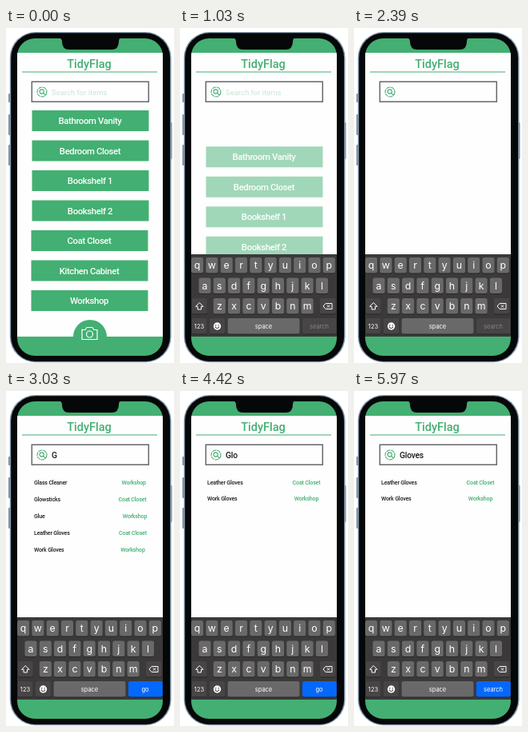
Recreate the animation shown at these times as an HTML page with a canvas. Size 210x419 px, loop 6 s.

```html
<!DOCTYPE html>
<html lang="en">
<head>
<meta charset="utf-8">
<title>TidyFlag</title>
<style>
html, body { margin: 0; width: 100%; height: 100%; overflow: hidden; background: #fff; }
canvas { display: block; width: 210px; height: 419px; }
</style>
</head>
<body>
<canvas id="stage"></canvas>
<script>
const W = 210, H = 419, LOOP = 6000;
const GREEN = '#43af72', LABEL = 'Roboto, sans-serif', KEYS = 'Inter, sans-serif';
const dpr = window.devicePixelRatio || 1;

function prepare(canvas) {
  canvas.width = W * dpr;
  canvas.height = H * dpr;
  const c = canvas.getContext('2d');
  c.scale(dpr, dpr);
  return c;
}

const stage = prepare(document.getElementById('stage'));
const layer = prepare(document.createElement('canvas'));
let ctx = stage;

const PLACES = ['Bathroom Vanity', 'Bedroom Closet', 'Bookshelf 1', 'Bookshelf 2',
  'Coat Closet', 'Kitchen Cabinet', 'Workshop'];
const ITEMS = [
  ['Glass Cleaner', 'Workshop', 159.7],
  ['Glowsticks', 'Coat Closet', 158],
  ['Glue', 'Workshop', 161],
  ['Leather Gloves', 'Coat Closet', 158.5],
  ['Work Gloves', 'Workshop', 158.5]
];
const TYPED = [2500, 3200, 3900, 4600, 5100, 5600];

const clamp = v => Math.max(0, Math.min(1, v));
const ease = (t, a, b) => { const p = clamp((t - a) / (b - a)); return p * p * (3 - 2 * p); };

function box(x, y, w, h, r, color) {
  ctx.fillStyle = color;
  ctx.beginPath();
  ctx.roundRect(x, y, w, h, r);
  ctx.fill();
}

function text(s, x, y, font, color, align = 'center', spacing = 0) {
  ctx.font = font;
  ctx.fillStyle = color;
  ctx.textAlign = align;
  ctx.letterSpacing = spacing + 'px';
  ctx.fillText(s, x, y);
}

function line(color, width, ...pts) {
  ctx.strokeStyle = color;
  ctx.lineWidth = width;
  ctx.beginPath();
  pts.forEach(([x, y], i) => i ? ctx.lineTo(x, y) : ctx.moveTo(x, y));
  ctx.stroke();
}

function ring(x, y, r, color, width, a = 0, b = Math.PI * 2) {
  ctx.strokeStyle = color;
  ctx.lineWidth = width;
  ctx.beginPath();
  ctx.arc(x, y, r, a, b);
  ctx.stroke();
}

function disc(x, y, r, color) {
  ctx.fillStyle = color;
  ctx.beginPath();
  ctx.arc(x, y, r, 0, Math.PI * 2);
  ctx.fill();
}

function phone() {
  const edge = '#7d92a5';
  box(3, 82, 4, 11, 1, edge);
  box(3, 108, 4, 26, 1, edge);
  box(3, 146, 4, 26, 1, edge);
  box(204, 118, 3.5, 46, 1, edge);
  box(4.8, 5, 201.7, 413.2, 32, '#8498aa');
  box(6.2, 6.2, 198.9, 410.8, 31, '#060708');
}

function notch() {
  ctx.fillStyle = '#060708';
  ctx.beginPath();
  ctx.moveTo(66, 12);
  ctx.lineTo(144, 12);
  ctx.quadraticCurveTo(141, 13, 141, 17);
  ctx.quadraticCurveTo(141, 27, 132, 27);
  ctx.lineTo(79, 27);
  ctx.quadraticCurveTo(70, 27, 70, 17);
  ctx.quadraticCurveTo(70, 13, 66, 12);
  ctx.fill();
}

function searchBox(query, hint) {
  ctx.strokeStyle = '#66686b';
  ctx.lineWidth = 1.5;
  ctx.strokeRect(32.3, 67.2, 146, 25);
  ctx.setLineDash([5, 0.7]);
  ring(45, 80, 6, GREEN, 1.1);
  ctx.setLineDash([]);
  ring(44.7, 79.5, 2.6, GREEN, 1.1);
  line(GREEN, 1.2, [46.6, 81.4], [49, 83.8]);
  if (hint) text('Search for items', 57, 83.7, '9.5px ' + LABEL, '#c8e6d5', 'left');
  text(query, 57, 84, '500 10.3px ' + LABEL, '#1b1b1b', 'left', -0.25);
}

function placeList(p) {
  PLACES.forEach((name, i) => {
    const y = 103 + i * 37.5 + p * 90, x = i < 4 ? 32.5 : 31.5;
    ctx.globalAlpha = 1 - p;
    box(x, y, 146, 26, 0, GREEN);
    ctx.globalAlpha = 1;
    text(name, x + 72.5, y + 17, '500 11.4px ' + LABEL, '#fbfefc', 'center', -0.4);
  });
}

function camera() {
  disc(105, 386, 21, GREEN);
  ctx.lineJoin = 'round';
  line('#fff', 1.2, [95, 377.5], [99, 377.5], [101, 374.5], [108, 374.5], [110, 377.5],
    [114, 377.5], [114, 389.5], [95, 389.5], [95, 377], [96, 377.5]);
  ring(104.5, 383, 4, '#fff', 1.2);
}

function results(n) {
  const short = n > 2;
  const list = short ? ITEMS.slice(3) : ITEMS;
  const font = '500 7.1px ' + LABEL;
  list.forEach(([item, place, x], i) => {
    const y = 116.7 + i * (short ? 20 : 21);
    text(item, short ? 34 : 35, y, font, '#1d1d1d', 'left', -0.2);
    text(place, short ? 158 : x, y, font, GREEN, 'center', -0.2);
  });
}

function key(x, y, w, color) {
  box(x - w / 2, y - 9.5, w, 20, 2.5, '#272626');
  box(x - w / 2, y - 10, w, 19.6, 2.5, color);
}

function letters(row, x, y) {
  [...row].forEach((c, i) => {
    const cx = x + i * 18.3;
    key(cx, y, 15.2, '#6a6969');
    text(c, cx, y + 4, '12.3px ' + KEYS, '#fff');
  });
}

function keys(n) {
  box(14, 283, 182, 104, 0, '#3b3939');
  letters('qwertyuiop', 21.6, 297);
  letters('asdfghjkl', 31, 322.5);
  letters('zxcvbnm', 49.3, 348);

  const dark = '#474545';
  key(24.3, 348, 19, dark);
  key(184.5, 348, 20, dark);
  line('#fff', 1, [24.3, 343.5], [29, 348.3], [26.5, 348.3], [26.5, 352],
    [22.1, 352], [22.1, 348.3], [19.6, 348.3], [24.3, 343.5]);
  line('#fff', 1, [179, 348], [182, 344.5], [190, 344.5], [190, 351.5], [182, 351.5], [179, 348]);
  line('#fff', 0.9, [183.7, 346.2], [187.3, 349.8]);
  line('#fff', 0.9, [187.3, 346.2], [183.7, 349.8]);

  key(24, 373, 19, dark);
  text('123', 24, 376, '7.5px ' + KEYS, '#fff');
  key(46.5, 373, 20, dark);
  disc(46.5, 373, 4.7, '#fff');
  disc(44.8, 371.8, 0.7, '#333');
  disc(48.2, 371.8, 0.7, '#333');
  ring(46.5, 373.4, 2.2, '#333', 1, 0, Math.PI);
  key(104.5, 373, 90, '#6a6969');
  text('space', 104.5, 375.6, '7.5px ' + KEYS, '#fff');
  key(174.3, 373, 43, n ? '#0468fb' : dark);
  text(n > 0 && n < 6 ? 'go' : 'search', 174, 375.6, '7.5px ' + KEYS, n ? '#fff' : '#858383');
}

// Painted on its own layer so that it fades as one piece.
function keyboard(p, n) {
  if (!p) return;
  ctx = layer;
  ctx.clearRect(0, 0, W, H);
  keys(n);
  ctx = stage;
  ctx.save();
  ctx.beginPath();
  ctx.rect(14, 283, 182, 103);
  ctx.clip();
  ctx.globalAlpha = p;
  ctx.drawImage(layer.canvas, 0, (1 - p) * 103, W, H);
  ctx.restore();
}

function draw(t) {
  const n = TYPED.filter(at => t >= at).length;
  const up = ease(t, 820, 1020);
  const away = ease(t, 833, 1228);
  box(0, 0, W, H, 0, '#fff');
  phone();

  ctx.save();
  ctx.beginPath();
  ctx.roundRect(14, 13, 182, 397, 22);
  ctx.clip();
  box(14, 13, 182, 397, 0, GREEN);
  box(14, 31, 182, 355, 0, '#fefefe');
  text('TidyFlag', 104, 50, '500 14.5px ' + LABEL, GREEN);
  line(GREEN, 1.2, [20, 55], [189, 55]);
  searchBox('Gloves'.slice(0, n), t < 1270);
  if (away < 1) {
    ctx.save();
    ctx.beginPath();
    ctx.rect(14, 31, 182, 355);
    ctx.clip();
    placeList(away);
    ctx.restore();
  }
  if (up < 1) camera();
  if (n) results(n);
  keyboard(up, n);
  ctx.restore();
  notch();
}

function tick() {
  draw(performance.now() % LOOP);
  requestAnimationFrame(tick);
}
tick();
</script>
</body>
</html>
```
